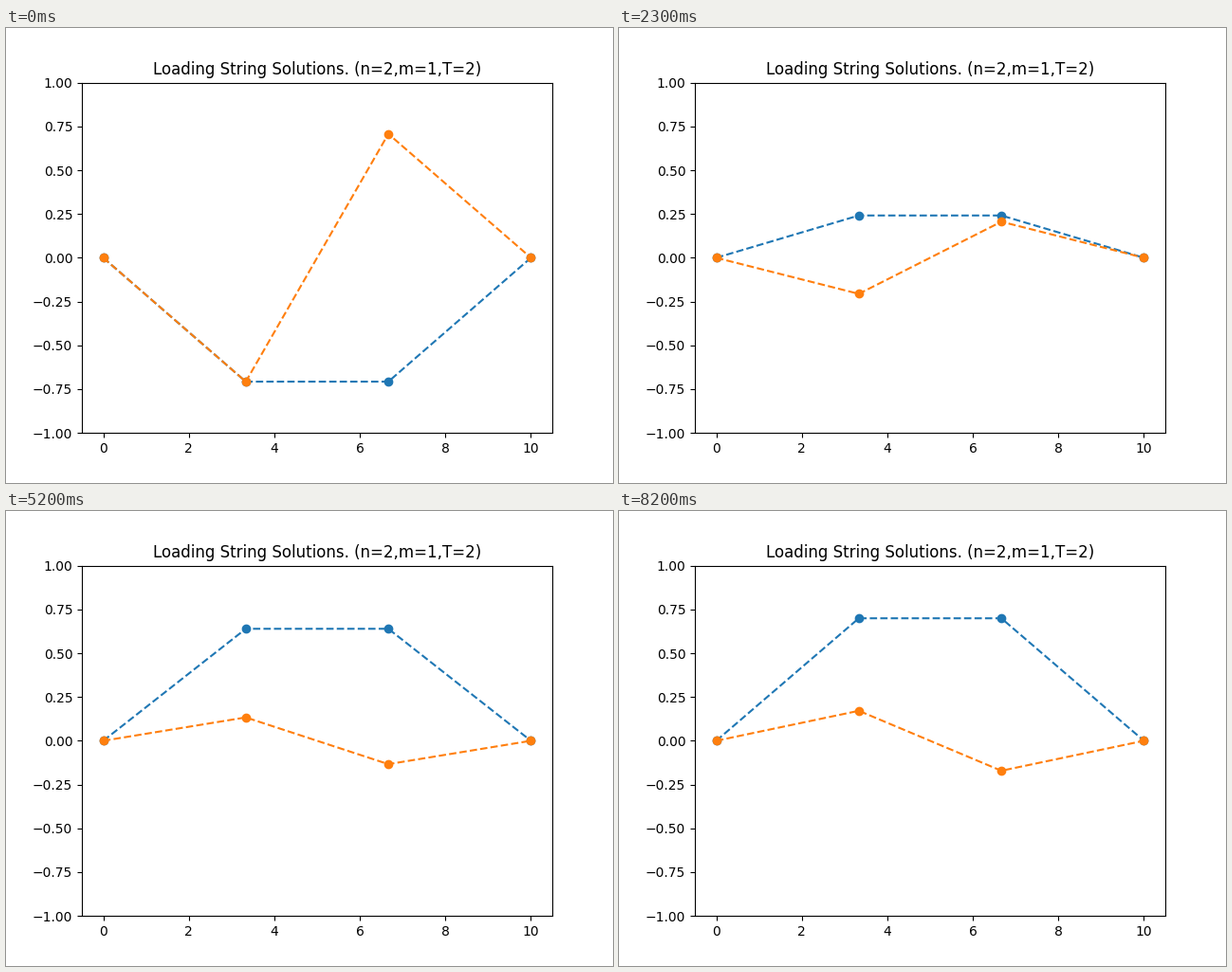
A matplotlib script that plays this animation: 640x480 px, repeating every 8.3 s.

```python
import numpy as np
import matplotlib.pyplot as plt
from matplotlib.animation import FuncAnimation

FRAMES = 83
INTERVAL = 100  # ms
N, M, T, LENGTH = 2, 1, 2, 10
BASE = 0.2 * np.sqrt(3.6)  # phase step per frame, before the mode factor

beads = np.arange(N + 2)
x = beads * LENGTH / (N + 1)


def displacement(mode, frame):
    """Shape of one normal mode of the loaded string, released from rest."""
    shape = np.sqrt(2 / (N + 1)) * np.sin(mode * np.pi * beads / (N + 1))
    omega = BASE * np.sin(mode * np.pi / (2 * (N + 1)))
    return -shape * np.cos(omega * frame)


fig, ax = plt.subplots(figsize=(6.4, 4.8), dpi=100)
ax.set_title(f"Loading String Solutions. (n={N},m={M},T={T})")
ax.set_xlim(-0.5, 10.5)
ax.set_ylim(-1, 1)

lines = [ax.plot(x, displacement(mode, 0), "o--", color=f"C{mode - 1}")[0]
         for mode in range(1, N + 1)]


def update(frame):
    for mode, line in enumerate(lines, start=1):
        line.set_ydata(displacement(mode, frame))
    return lines


anim = FuncAnimation(fig, update, frames=FRAMES, interval=INTERVAL,
                     repeat=True, repeat_delay=0)
plt.show()
```
